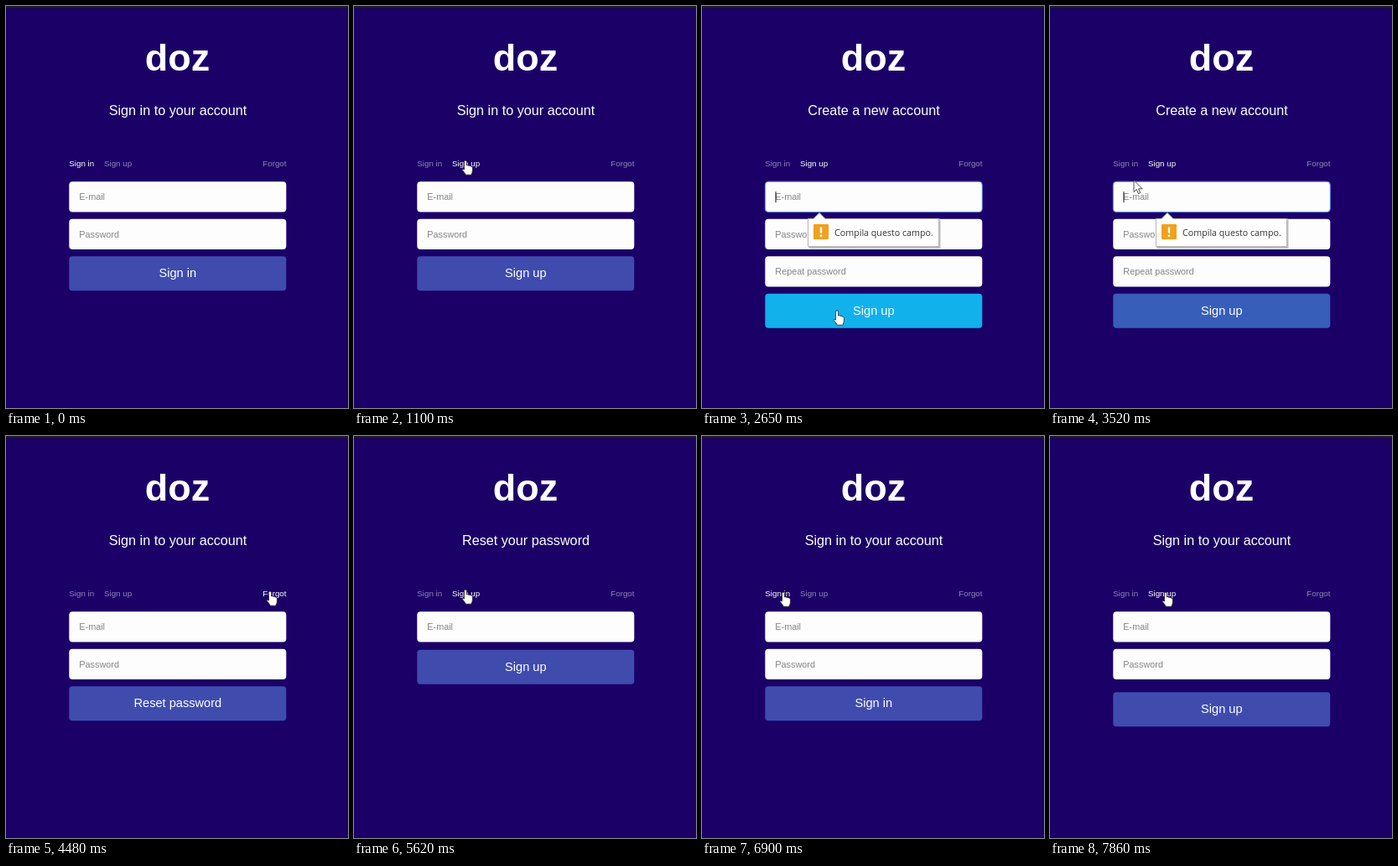
Write an HTML page that moves like this. It is 408 px wide and 479 px high and loops after 7.99 s.

```html
<!DOCTYPE html>
<html lang="en">
<head>
<meta charset="utf-8">
<title>Sign in form</title>
<style>
  html, body { margin: 0; width: 100%; height: 100%; overflow: hidden; background: #1b0067; }
  svg { display: block; width: 408px; height: 479px; font-family: "Liberation Sans", Arial, sans-serif; }
  .mid { text-anchor: middle; fill: #fff; }
  .name { font-size: 45px; font-weight: bold; }
  .title { font-size: 16.2px; }
  .tab { font-size: 9.75px; fill: #fff; }
  .field rect { fill: #fdfdfd; }
  .field text { font-size: 10.85px; fill: #858585; }
  .label { font-size: 14.6px; }
  .tip text { font: 10.7px "Open Sans", "Noto Sans", sans-serif; fill: #333; }
  .pointer path { fill: #fff; stroke: #222; stroke-width: .8; stroke-linejoin: round; }
  .pointer .beam { fill: none; stroke-width: 1; }
</style>
</head>
<body>
<svg viewBox="0 0 408 479">
  <rect width="408" height="479" fill="#1b0067"/>
  <rect width="408" height="2.5" fill="#1d1b27"/>
  <text class="mid name" x="204.5" y="77">doz</text>
  <text class="mid title" id="title" x="205" y="130"></text>

  <text class="tab" x="75.3" y="191">Sign in</text>
  <text class="tab" x="117" y="191">Sign up</text>
  <text class="tab" x="334.5" y="191" text-anchor="end">Forgot</text>

  <g class="field" transform="translate(75.3 209.2)">
    <rect id="email" width="259" height="36.4" rx="4"/>
    <text x="12" y="22">E-mail</text>
    <path id="caret" d="M12.7 12v13" stroke="#111"/>
  </g>
  <g class="field" transform="translate(75.3 253.7)">
    <rect width="259" height="36.4" rx="4"/>
    <text x="12" y="22">Password</text>
  </g>
  <g class="field" transform="translate(75.3 298.2)">
    <rect width="259" height="36.4" rx="4"/>
    <text x="12" y="22">Repeat password</text>
  </g>

  <g id="button">
    <rect id="face" width="259" height="41" rx="4"/>
    <text class="mid label" id="label" x="129.5" y="24.9"></text>
  </g>
  <rect id="cover" x="70" y="374" width="270" height="14" fill="#1b0067"/>

  <g class="tip" id="tip">
    <path d="M127.500 255h157v34h-157z" fill="#000" opacity=".25"/>
    <path d="M126.500 253.500H133L140 246.500L147 253.500H282.500V286.500H126.500z" fill="#fff" stroke="#b4b4b8"/>
    <rect x="133" y="260" width="18" height="18" rx="1" fill="#f2a11c"/>
    <path d="M142 263.500v7M142 272.500v2.500" stroke="#fff" stroke-width="2.400"/>
    <text x="158" y="274">Compila questo campo.</text>
  </g>

  <g class="pointer" id="pointer">
    <path class="arrow" d="M0 0V14L3.300 11L5.400 16L7.600 15L5.500 10.200H10z"/>
    <path class="hand" d="M-1.500 11V1.500a1.500 1.500 0 0 1 3 0V6q1.300-1 2.400.4 1.400-.7 2.300.6 2-.3 2.200 1.600V12q0 2-1.600 5.200H.4Q-1.400 14-3.900 11.300q-.5-2 2.400-.3z"/>
    <path class="beam" d="M-2.500-7H2.500M0-7V7M-2.500 7H2.500"/>
  </g>
</svg>
<script>
const LOOP = 7990, SLIDE = 420, TOP = 209.2, ROW = 44.5, LEFT = 75.3;

// Each mode: title, button label, number of fields
const MODES = [
  ['Sign in to your account', 'Sign in', 2],
  ['Create a new account', 'Sign up', 3],
  ['Reset your password', 'Reset password', 1]
];

// [time, mode] for each tab click
const CLICKS = [[-1000, 0], [1100, 1], [3600, 0], [4475, 2], [5592, 1], [6300, 0], [7750, 1]];

// [time, x, y] of the pointer's hot spot
const TRACK = [
  [170, 8, 308], [470, 218, 215], [770, 133, 184], [1300, 133, 184],
  [1780, 160, 353], [1960, 160, 353], [2240, 161, 363], [3310, 161, 363],
  [3580, 92, 187], [3900, 92, 187], [4350, 315, 185], [4800, 315, 185],
  [5440, 133, 183], [5900, 133, 183], [6250, 97, 186], [7160, 97, 186],
  [7630, 138, 186], [LOOP, 138, 186]
];

const $ = id => document.getElementById(id);
const all = sel => [...document.querySelectorAll(sel)];
const [tabs, fields, shapes] = ['.tab', '.field', '.pointer path'].map(all);
const clamp = v => Math.min(1, Math.max(0, v));
const ease = v => (1 - Math.cos(Math.PI * clamp(v))) / 2;
const ramp = (t, start, length) => ease((t - start) / length);
const mix = (a, b, k) => a + (b - a) * k;
const show = (el, on) => el.setAttribute('opacity', Number(on));

function pointerAt(t) {
  const i = TRACK.findIndex(p => p[0] > t);
  if (i < 1) return null;
  const [t0, x0, y0] = TRACK[i - 1], [t1, x1, y1] = TRACK[i];
  const k = ramp(t, t0, t1 - t0);
  return [mix(x0, x1, k), mix(y0, y1, k)];
}

function pointerShape(x, y, rows) {
  if (y > 180 && y < 200) return x > 75 && x < 152 || x > 304 && x < 336 ? 1 : 0;
  if (x < LEFT || x > LEFT + 259 || y < TOP) return 0;
  const buttonY = TOP + rows * ROW;
  if (y >= buttonY) return y < buttonY + 41 ? 1 : 0;
  return (y - TOP) % ROW < 36.4 ? 2 : 0;
}

function draw(t) {
  const n = CLICKS.filter(c => c[0] <= t).length - 1;
  const [clickTime, mode] = CLICKS[n];
  const before = n ? CLICKS[n - 1][1] : mode;
  const k = ramp(t, clickTime, SLIDE);
  const rows = mix(MODES[before][2], MODES[mode][2], k);

  $('title').textContent = MODES[k < 1 ? before : mode][0];
  $('label').textContent = MODES[mode][1];
  tabs.forEach((tab, i) => show(tab, i === mode ? 1 : 0.52));
  fields.forEach((f, i) => show(f, clamp((rows - i - 0.35) / 0.5)));
  $('button').setAttribute('transform', `translate(${LEFT} ${TOP + rows * ROW})`);

  const hover = ramp(t, 1960, 250) - ramp(t, 3340, 250);
  const rgb = [[63, 76, 174], [17, 177, 236]];
  $('face').setAttribute('fill', `rgb(${rgb[0].map((c, i) => Math.round(mix(c, rgb[1][i], hover)))})`);
  show($('cover'), t >= 1780 && t < 1960);

  const focused = t >= 2400 && t < 3600;
  $('email').setAttribute('stroke', focused ? '#5b86d6' : 'none');
  show($('caret'), focused && (t - 2400) % 1060 < 530);
  show($('tip'), focused ? ramp(t, 2400, 180) : 0);

  const at = pointerAt(t);
  show($('pointer'), at);
  show($('pointer'), at ? 1 : 0);
  if (at) {
    const kind = pointerShape(...at, rows);
    $('pointer').setAttribute('transform', `translate(${at})`);
    shapes.forEach((s, i) => show(s, i === kind));
  }
}

let start;
function tick(now) {
  start ??= now;
  draw((now - start) % LOOP);
  requestAnimationFrame(tick);
}
draw(0);
requestAnimationFrame(tick);
</script>
</body>
</html>
```
